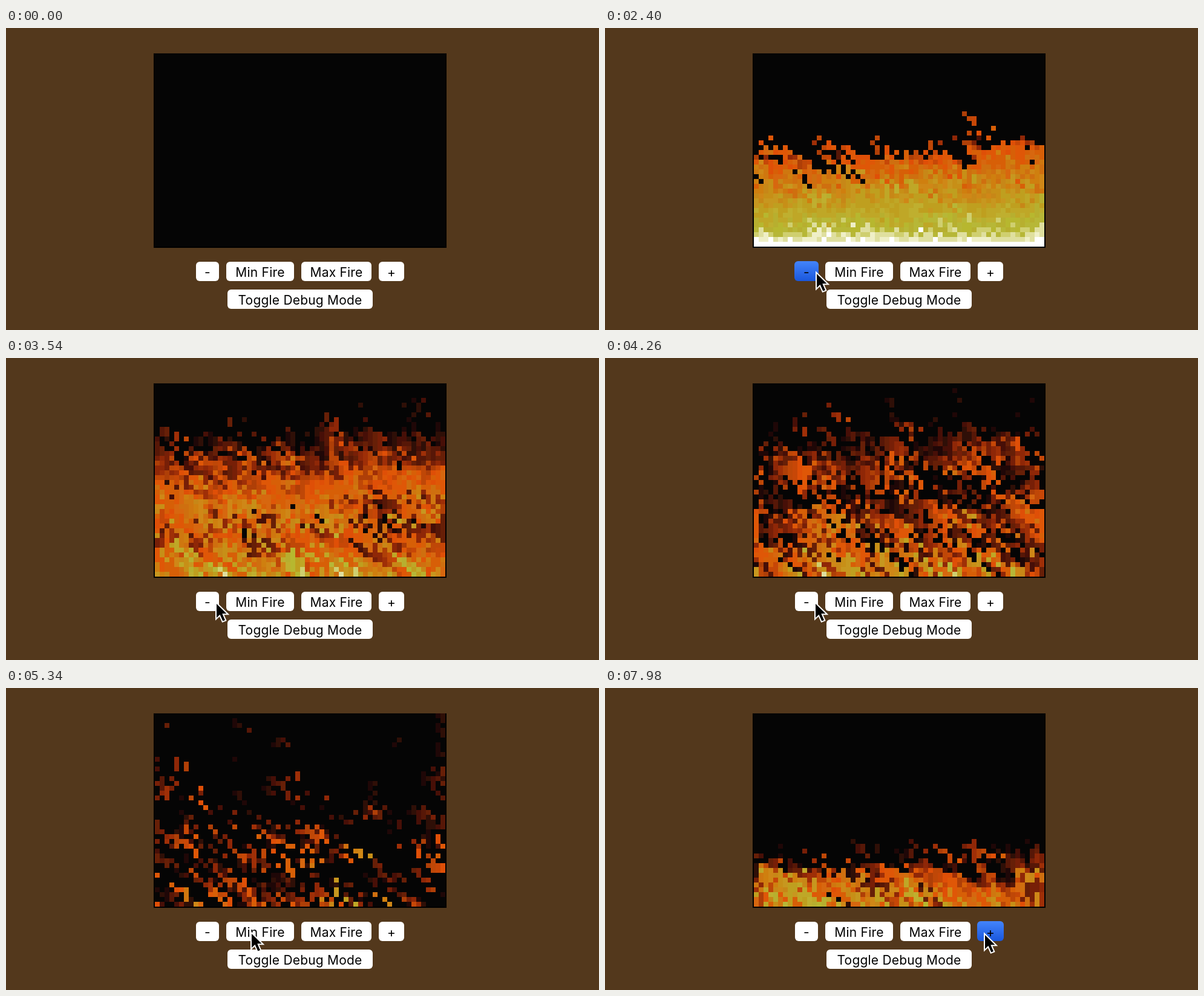
Write an HTML page with a canvas that moves like this. It is 980 px wide and 500 px high and loops after 8000 ms.

```html
<!DOCTYPE html>
<html lang="en">
<head>
<meta charset="utf-8">
<title>Fire</title>
<style>
html, body { margin: 0; width: 100%; height: 100%; overflow: hidden; background: #53381c; }
#stage { position: relative; width: 980px; height: 500px; overflow: hidden; }
canvas { position: absolute; left: 244px; top: 42px; }
svg { position: absolute; left: 0; top: 0; }
text { font: 21px Inter, "Open Sans", sans-serif; letter-spacing: .2px; text-anchor: middle; fill: #000; }
</style>
</head>
<body>
<div id="stage">
  <canvas width="484" height="322"></canvas>
  <svg width="980" height="500" viewBox="0 0 980 500">
    <defs>
      <linearGradient id="pressed" x2="0" y2="1">
        <stop offset="0" stop-color="#4384fb"/>
        <stop offset="1" stop-color="#1a57dc"/>
      </linearGradient>
    </defs>
    <g id="buttons"></g>
    <path id="cursor" d="M2 5V28L7.5 22.7L12.3 33.5L16 32L11.3 21.3H18.5Z"
      fill="#000" stroke="#fff" stroke-width="4" paint-order="stroke"/>
  </svg>
</div>
<script>
const LOOP = 8000, TICK = 60, TICKS = Math.ceil(LOOP / TICK);
const COLS = 60, ROWS = 40, CELL = 8, MAX = 36;
const BASE = COLS * (ROWS - 1);

const palette = ('050505 1f0707 2f0f07 470f07 571707 671f07 771f07 8f2707 9f2f07 af3f07 ' +
  'bf4707 c74707 df4f07 df5707 df5707 d75f07 d75f07 d7670f cf6f0f cf770f cf7f0f cf8717 ' +
  'c78717 c78f17 c7971f bf9f1f bf9f1f bfa727 bfa727 bfaf2f b7af2f b7b72f b7b737 cfcf6f ' +
  'dfdf9f efefc7 ffffff').split(' ').map(hex => '#' + hex);

// Seeded generator keeps every loop identical
let seed = 20;
function random() {
  seed = (seed + 0x6d2b79f5) | 0;
  let r = Math.imul(seed ^ (seed >>> 15), 1 | seed);
  r = (r + Math.imul(r ^ (r >>> 7), 61 | r)) ^ r;
  return ((r ^ (r >>> 14)) >>> 0) / 4294967296;
}
const below = n => Math.floor(random() * n);

// How each button changes the bottom row
const actions = {
  minus: v => Math.max(0, v - below(14)),
  min: () => 0,
  max: () => MAX,
  plus: v => Math.min(MAX, v + below(14))
};

// Each click: button, tick pressed, tick released
const clicks = [
  ['max', 14, 16],
  ['minus', 39, 41], ['minus', 44, 46], ['minus', 60, 61], ['minus', 72, 74], ['minus', 77, 79],
  ['min', 90, 92],
  ['plus', 112, 114], ['plus', 117, 119], ['plus', 123, 125], ['plus', 132, 135]
];

function spread(fire) {
  for (let col = 0; col < COLS; col++) {
    for (let i = col; i < BASE; i += COLS) {
      const decay = below(3);
      if (i >= decay) fire[i - decay] = Math.max(0, fire[i + COLS] - decay);
    }
  }
}

function simulate() {
  const fire = new Uint8Array(COLS * ROWS), states = [];
  for (let tick = 0; tick < TICKS; tick++) {
    for (const [name, , released] of clicks) {
      if (released !== tick) continue;
      for (let i = BASE; i < fire.length; i++) fire[i] = actions[name](fire[i]);
    }
    spread(fire);
    states.push(fire.slice());
  }
  return states;
}

const fireStates = simulate();
const ctx = document.querySelector('canvas').getContext('2d');

function drawFire(fire) {
  ctx.fillStyle = '#000';
  ctx.fillRect(0, 0, 484, 322);
  ctx.fillStyle = palette[0];
  ctx.fillRect(2, 0, COLS * CELL, ROWS * CELL);
  fire.forEach((value, i) => {
    if (!value) return;
    ctx.fillStyle = palette[value];
    ctx.fillRect(2 + (i % COLS) * CELL, Math.floor(i / COLS) * CELL, CELL, CELL);
  });
}

function make(tag, attrs, parent) {
  const node = document.createElementNS('http://www.w3.org/2000/svg', tag);
  for (const key in attrs) node.setAttribute(key, attrs[key]);
  return parent.appendChild(node);
}

const buttons = [
  ['minus', '-', 314, 387, 38],
  ['min', 'Min Fire', 364, 387, 112],
  ['max', 'Max Fire', 488, 387, 116],
  ['plus', '+', 616, 387, 42],
  ['debug', 'Toggle Debug Mode', 366, 433, 240]
].map(([name, label, x, y, width]) => {
  const group = document.getElementById('buttons');
  const rect = make('rect', { rx: 6 }, group);
  make('text', { x: x + width / 2, y: y + 25 }, group).textContent = label;
  return { name, rect, x, y, width };
});

function drawButtons(tick) {
  for (const { name, rect, x, y, width } of buttons) {
    const down = clicks.some(([n, from, to]) => n === name && tick >= from && tick < to);
    const grow = down ? 1 : 0;
    const attrs = { x: x - grow, y: y - grow, width: width + 2 * grow, height: 32 + grow,
      fill: down ? 'url(#pressed)' : '#fff' };
    for (const key in attrs) rect.setAttribute(key, attrs[key]);
  }
}

// Pointer stops: time, x, y
const stops = [
  [300, 520, 505], [750, 540, 402], [1740, 540, 402], [2220, 348, 402], [2460, 348, 402],
  [2640, 346, 402], [4920, 346, 402], [5280, 404, 402], [5700, 404, 402], [6300, 619, 405],
  [6600, 619, 405], [6780, 626, 404], [8000, 626, 404]
];
const cursor = document.getElementById('cursor');

function drawCursor(time) {
  let [, x, y] = stops[0];
  for (let i = 1; i < stops.length; i++) {
    const [t0, x0, y0] = stops[i - 1], [t1, x1, y1] = stops[i];
    if (time < t0) break;
    const p = Math.min(1, (time - t0) / (t1 - t0)), ease = p * p * (3 - 2 * p);
    x = x0 + (x1 - x0) * ease;
    y = y0 + (y1 - y0) * ease;
  }
  cursor.setAttribute('transform', `translate(${x} ${y})`);
}

let shown = -1;
function render() {
  const tick = Math.floor((performance.now() % LOOP) / TICK);
  if (tick !== shown) {
    shown = tick;
    drawFire(fireStates[tick]);
    drawButtons(tick);
    drawCursor(tick * TICK);
  }
  requestAnimationFrame(render);
}
render();
</script>
</body>
</html>
```
